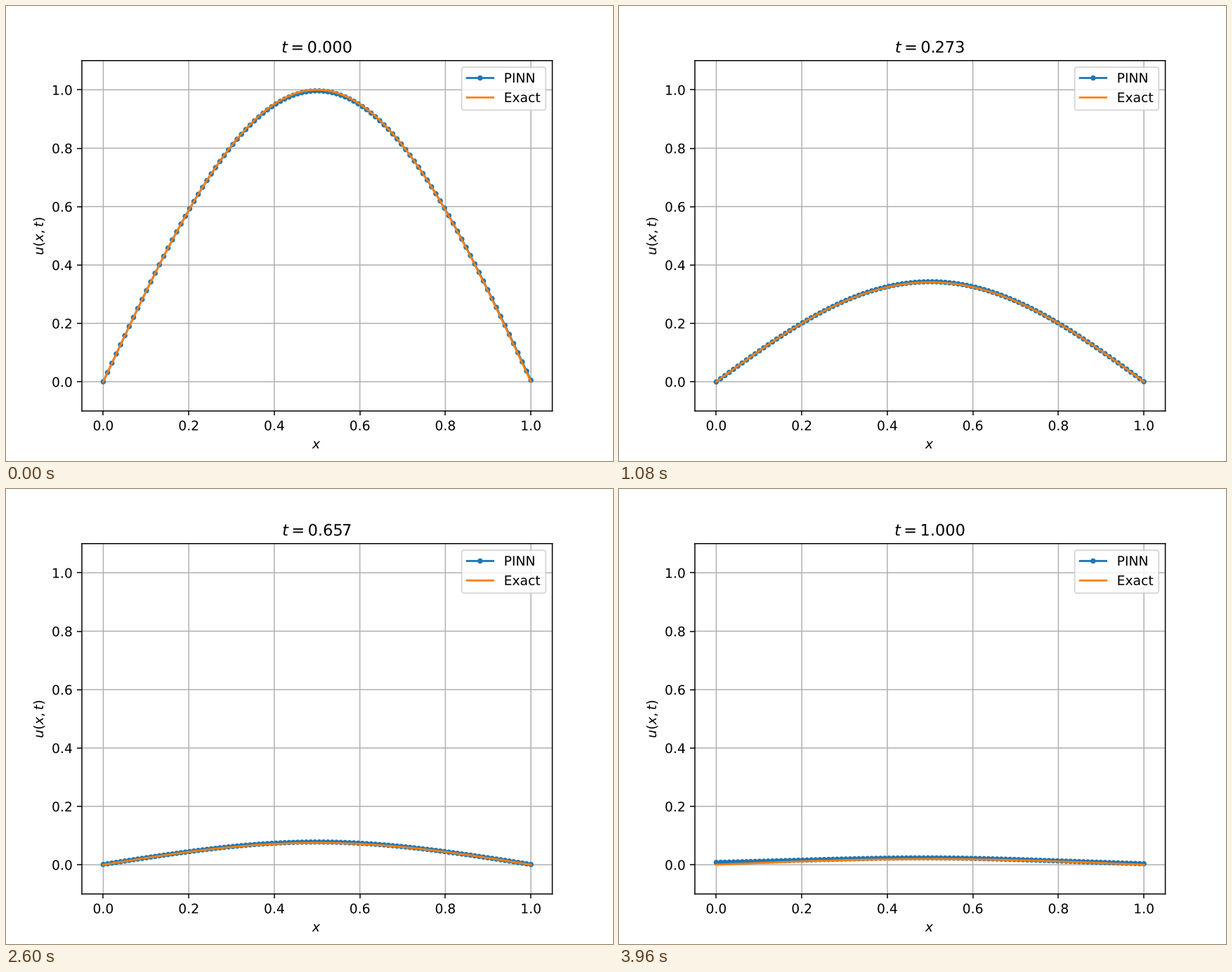
Write a matplotlib script that moves like this. It is 864 px wide and 648 px high and loops after 4000 ms.

```python
import numpy as np
import matplotlib.pyplot as plt
from matplotlib.animation import FuncAnimation
from matplotlib.patheffects import Normal

FRAMES = 100
INTERVAL = 40
ALPHA = 0.4

# Place lines, markers and glyphs at sub-pixel positions
plt.rcParams.update({
    "path.snap": False,
    "path.effects": [Normal()],
    "text.hinting": "none",
})

x = np.linspace(0, 1, 100)


def exact(t):
    return np.exp(-ALPHA * np.pi**2 * t) * np.sin(np.pi * x)


def network(t):
    """Exact solution plus a small drifting fit error."""
    mid = 0.003 - 0.007 * np.exp(-7 * t)
    early_left = -0.06 * t * np.exp(-(t / 0.15)**2)
    late_left = 0.008 * t**5
    right = 0.005 * np.exp(-12 * t) + 0.0035 * t**3
    return (exact(t) + mid * np.sin(np.pi * x)**4
            + early_left * (1 - x)**8
            + late_left * (1 - x)**3
            + right * x**4)


fig, ax = plt.subplots(figsize=(6.4, 4.8), dpi=135)
pinn_line, = ax.plot(x, network(0), "o-", markersize=3, label="PINN")
exact_line, = ax.plot(x, exact(0), label="Exact")
ax.set_xlim(-0.05, 1.05)
ax.set_ylim(-0.1, 1.1)
ax.set_xlabel("$x$")
ax.set_ylabel("$u(x,t)$")
ax.grid(True)
ax.legend(loc="upper right")
title = ax.set_title("$t=0.000$")


def update(i):
    t = i / (FRAMES - 1)
    pinn_line.set_ydata(network(t))
    exact_line.set_ydata(exact(t))
    title.set_text(f"$t={t:.3f}$")
    return pinn_line, exact_line, title


anim = FuncAnimation(fig, update, frames=FRAMES, interval=INTERVAL,
                     init_func=lambda: update(0), repeat=True)
plt.show()
```
